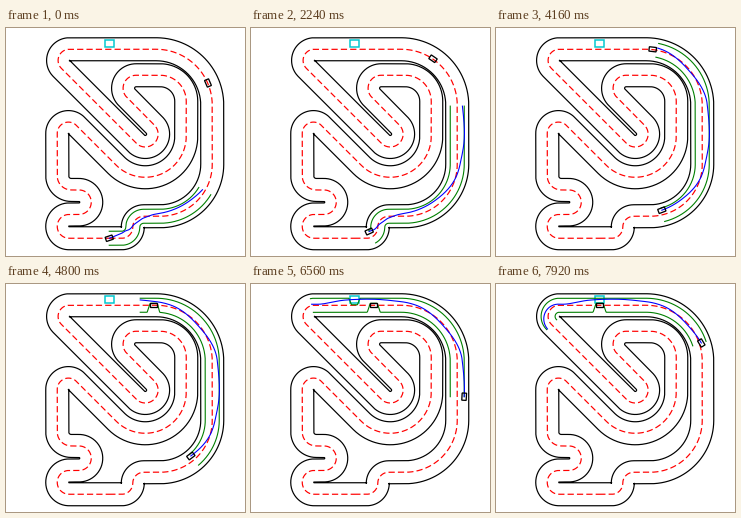
Recreate the animation shown at these times as a matplotlib script. Size 239x228 px, loop 8 s.

```python
import numpy as np
import matplotlib.pyplot as plt
from matplotlib.animation import FuncAnimation
from matplotlib.patches import Polygon, Rectangle

W, H, DPI = 239, 228, 64
FRAMES, INTERVAL = 100, 80
PX = 72 / DPI
HALF_TRACK, HALF_LANE = 11.5, 7
GREEN, CYAN = "#007f00", "#00c8d0"

# Centre line corners in driving order: x, y, fillet radius
START = (103, 210)
CORNERS = [
    (126.5, 210, 11), (126.5, 188, 11), (206, 188, 52), (206, 21, 56),
    (36, 21, 11.2), (139, 124, 12.7), (157.1, 105.9, 12.7), (98.6, 47, 13),
    (180, 47, 26), (180, 207, 41), (51, 78, 11.2), (51, 161.7, 14),
    (85, 161.7, 12.2), (85, 186.2, 12.2), (51, 186.2, 11.8), (51, 210, 11.8),
]

# Apexes of the racing line: distance along the track, offset to the right
APEXES = [(0, 0), (20, -6), (38, 3), (58, -2), (100, -5), (136, 1), (170, 7),
          (205, 5), (243, -1), (278, 2), (320, 6), (350, 5), (376, 1), (406, 6)]

TOP_SPEED, RAMP = 3.15, 32
SHORT_PLAN, LONG_PLAN, PLAN_GROWTH = 117, 216, 24
TRACK_SEEN = 406
OTHER_START, OTHER_SPEED = 227, 1.13
BOX_S = 339


def fillet(before, corner, after, radius):
    """Arc of the given radius that rounds off a corner."""
    a, b = before - corner, after - corner
    a, b = a / np.hypot(*a), b / np.hypot(*b)
    half = np.arccos(np.clip(a @ b, -1, 1)) / 2
    bisector = (a + b) / np.hypot(*(a + b))
    side = a - (a @ bisector) * bisector
    side /= np.hypot(*side)
    centre = corner + bisector * radius / np.sin(half)
    sweep = np.pi / 2 - half
    phi = np.linspace(sweep, -sweep, 60)[:, None]
    return centre + radius * (np.sin(phi) * side - np.cos(phi) * bisector)


def build_centre_line():
    nodes = np.array([START] + [c[:2] for c in CORNERS] + [START], float)
    parts = [nodes[:1]]
    for i, (_, _, radius) in enumerate(CORNERS):
        parts.append(fillet(nodes[i], nodes[i + 1], nodes[i + 2], radius))
    pts = np.vstack(parts + [nodes[-1:]])
    dist = np.r_[0, np.cumsum(np.hypot(*np.diff(pts, axis=0).T))]
    s = np.linspace(0, dist[-1], 2400)
    xy = np.column_stack([np.interp(s, dist, pts[:, k]) for k in (0, 1)])
    tangent = np.gradient(xy, axis=0)
    tangent /= np.hypot(*tangent.T)[:, None]
    return s, xy, np.column_stack([-tangent[:, 1], tangent[:, 0]])


S, CENTRE, NORMAL = build_centre_line()


def on_track(s, d):
    """Point at distance s along the centre line, d to the right of it."""
    return np.column_stack([
        np.interp(s, S, CENTRE[:, k]) + d * np.interp(s, S, NORMAL[:, k])
        for k in (0, 1)])


def racing_offset(s):
    """Cubic curve through the apexes."""
    xs, ys = np.array(APEXES, float).T
    slope = np.gradient(ys, xs)
    i = np.clip(np.searchsorted(xs, s, side="right") - 1, 0, len(xs) - 2)
    h = xs[i + 1] - xs[i]
    t = (s - xs[i]) / h
    return ((1 + 2 * t) * (1 - t) ** 2 * ys[i] + t * (1 - t) ** 2 * h * slope[i]
            + t * t * (3 - 2 * t) * ys[i + 1] + t * t * (t - 1) * h * slope[i + 1])


def distance_driven(frame):
    """The car pulls away from rest and settles at top speed."""
    t = np.linspace(0, frame, 200)
    return frame * np.mean(TOP_SPEED * (1 - np.exp(-(t / RAMP) ** 2)))


def plan_length(frame):
    return LONG_PLAN - (LONG_PLAN - SHORT_PLAN) * np.exp(-frame / PLAN_GROWTH)


def bump(s, where, flat, reach):
    return np.clip((reach - np.abs(s - where)) / (reach - flat), 0, 1)


def car_shape(pos, heading):
    along = heading / np.hypot(*heading)
    across = np.array([-along[1], along[0]])
    return [pos + 3.6 * a * along + 2.2 * b * across
            for a, b in ((1, 1), (1, -1), (-1, -1), (-1, 1))]


fig = plt.figure(figsize=(W / DPI, H / DPI), dpi=DPI, facecolor="white")
ax = fig.add_axes([0, 0, 1, 1])
ax.set(xlim=(-0.25, W - 0.25), ylim=(H - 0.25, -0.25))
ax.axis("off")


def line(points, color, width=1.1, **kw):
    return ax.plot(*np.transpose(points), color=color, lw=width * PX, **kw)[0]


for offset in (-HALF_TRACK, HALF_TRACK):
    line(CENTRE + offset * NORMAL, "black", 1.2, solid_capstyle="butt")
line(CENTRE, "red", 1.2, ls=(0, (5.2, 2.6)), dash_capstyle="butt")
ax.add_patch(Rectangle((98.3, 12), 9.6, 6.7, fill=False, ec=CYAN,
                       lw=1.5 * PX, zorder=3))
left_lane = line([START], GREEN, zorder=4)
right_lane = line([START], GREEN, zorder=4)
plan = line([START], "blue", zorder=5)
cars = [ax.add_patch(Polygon([START] * 4, fill=False, ec="black",
                             lw=1.3 * PX, zorder=6)) for _ in range(2)]


def update(frame):
    first = distance_driven(frame)
    last = min(first + plan_length(frame), TRACK_SEEN)
    s = np.linspace(first, last, 300)
    path = on_track(s, racing_offset(s))
    plan.set_data(*path.T)

    # The lane gives way around the other car and the parked box
    other = OTHER_START + OTHER_SPEED * frame
    left = np.full_like(s, -HALF_LANE)
    right = -left
    if other < last:
        left += 9 * bump(s, other, 3.5, 6.5)
    if BOX_S < last and BOX_S - other > 12:
        right -= 6.5 * bump(s, BOX_S, 3, 5.5)
    left_lane.set_data(*on_track(s, left).T)
    right_lane.set_data(*on_track(s, right).T)

    cars[0].set_xy(car_shape(path[0], path[5] - path[0]))
    nearby = on_track(other + np.array([-1, 0, 1]), 0.3)
    cars[1].set_xy(car_shape(nearby[1], nearby[2] - nearby[0]))
    return [left_lane, right_lane, plan, *cars]


anim = FuncAnimation(fig, update, frames=FRAMES, interval=INTERVAL,
                     repeat=True, repeat_delay=0, blit=False)
plt.show()
```
